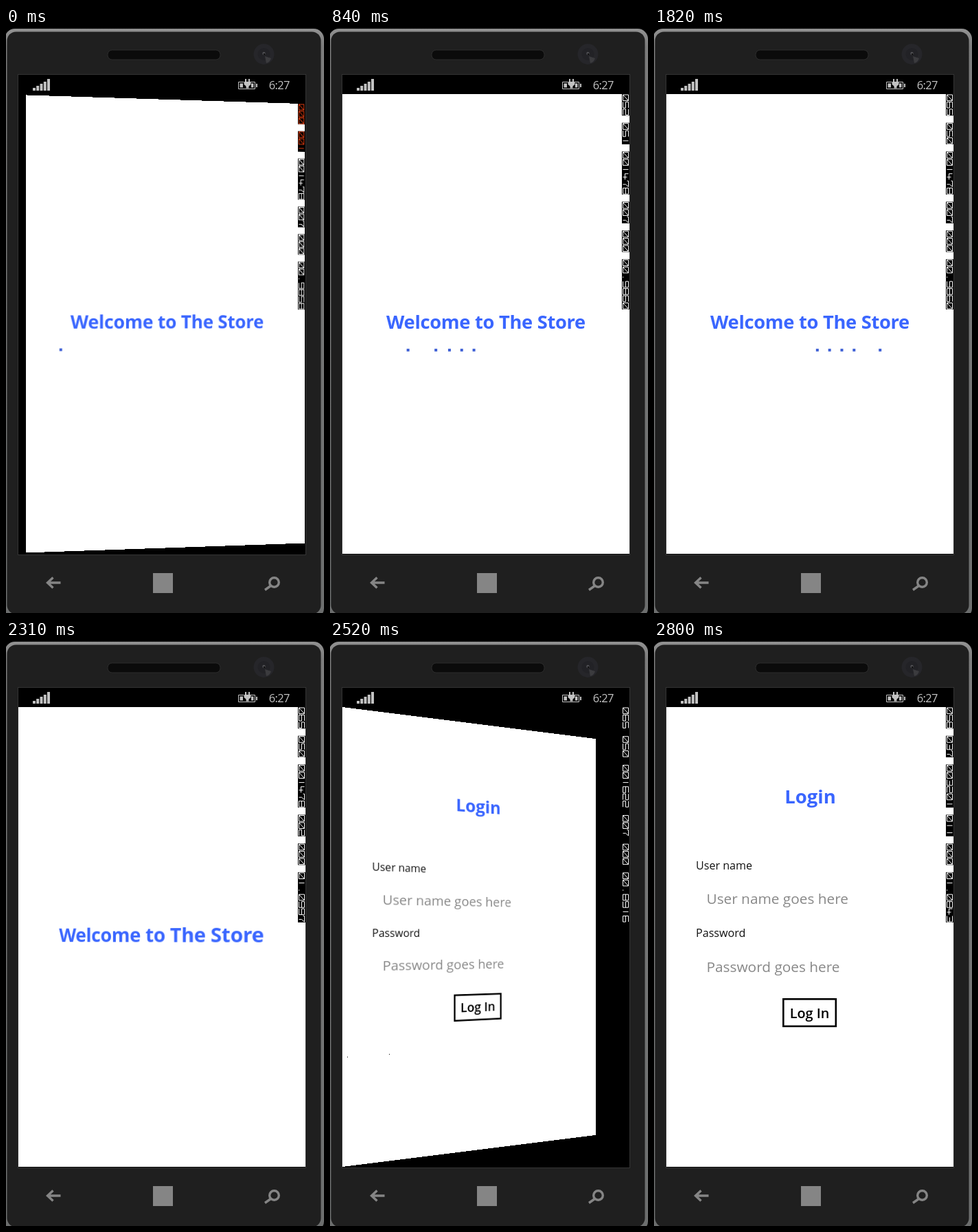
Write an HTML page that moves like this. It is 463 px wide and 850 px high and loops after 5.53 s.

```html
<!DOCTYPE html>
<html lang="en">
<head>
<meta charset="utf-8">
<title>Phone page turn</title>
<style>
  html, body { margin: 0; width: 100%; height: 100%; overflow: hidden; background: #000; }
  svg { position: absolute; left: 0; top: 0; display: block; }
  text { font-family: "Open Sans", "Noto Sans", sans-serif; }
  #stage { position: relative; width: 463px; height: 850px; overflow: hidden; }
  #screen, #app { position: absolute; width: 418px; height: 668px; overflow: hidden; perspective: 870px; }
  #screen { left: 18px; top: 96px; background: #000; perspective-origin: 50% 320px; }
  #app { left: 0; top: 0; perspective-origin: 50% 50%; }
  #app, .page { transform-origin: 0 50%; }
  .page { background: #fff; }
  .title { font-weight: 700; fill: #3a66ff; text-anchor: middle; }
  .label { font-size: 16.1px; fill: #111; }
  .hint { font-size: 20.8px; fill: #888; }
</style>
</head>
<body>
<div id="stage">
  <svg width="463" height="850" viewBox="0 0 463 850">
    <defs>
      <linearGradient id="rim" x2="0" y2="1">
        <stop offset="0" stop-color="#929292"/>
        <stop offset=".03" stop-color="#7c7c7c"/>
        <stop offset="1" stop-color="#6c6e6e"/>
      </linearGradient>
    </defs>
    <rect width="463" height="850" fill="#000"/>
    <rect x="-2" y="1" width="465" height="857" rx="15" fill="url(#rim)"/>
    <rect x="1.500" y="5.500" width="457" height="846" rx="13" fill="#1f1f1f"/>
    <rect x="148" y="32" width="164" height="14" rx="6.500" fill="#0b0b0b" stroke="#2c2c2c"/>
    <circle cx="375.500" cy="38" r="15" fill="#26262a"/>
    <circle cx="375.500" cy="38" r="9" fill="#222226"/>
    <path d="M377 41L386 44Q384 50 379 51Z" fill="#3b3b3e"/>
    <circle cx="375.500" cy="37" r="2.200" fill="#505054"/>
    <circle cx="376" cy="38" r="1.200" fill="#111"/>
    <rect x="17.500" y="67.500" width="419" height="698" fill="#000" stroke="#343434"/>

    <g fill="#c2c2c2">
      <path d="M39 87h4v4h-4zM44.200 84h4v7h-4zM49.500 81h4v10h-4zM54.800 78h4v13h-4zM60 74h4v17h-4z"/>
      <path d="M346 78.500H338.500V88.500H362.500V78.500H356" fill="none" stroke="#c2c2c2"/>
      <path d="M340.500 80.500h4.500v6h-4.500zM357 80.500h3.500v6h-3.500zM364 81h2v5h-2z"/>
      <path d="M348 74h2v4h3v-4h2v4h1.500v4l-3 2.500v3h-4v-3l-3-2.500v-4h1.500z"/>
      <text x="382.800" y="89" font-size="16.500" letter-spacing="-.7">6:27</text>
    </g>

    <g fill="none" stroke="#858585" stroke-width="3.400">
      <path d="M79.500 806H60M68.500 798.500L60.500 806L68.500 813.500"/>
      <circle cx="390.500" cy="805.500" r="6.800"/>
      <path d="M385.500 810.500L377 816.500"/>
    </g>
    <rect x="214" y="792" width="29" height="29" fill="#858585"/>
  </svg>

  <div id="screen">
    <div id="app">
      <svg id="welcome" class="page" width="418" height="668" viewBox="18 96 418 668">
        <text class="title" x="227" y="437" font-size="27.300" letter-spacing="-.3">Welcome to The Store</text>
        <g id="dots" fill="#4263d6"></g>
      </svg>
      <svg id="login" class="page" width="418" height="668" viewBox="18 96 418 668">
        <text class="title" x="227.500" y="235.500" font-size="27.500">Login</text>
        <text class="label" x="61" y="332">User name</text>
        <text class="hint" x="76.500" y="382">User name goes here</text>
        <text class="label" x="61" y="430">Password</text>
        <text class="hint" x="76.500" y="480.500">Password goes here</text>
        <rect x="188.300" y="520.300" width="76.500" height="39.500" fill="none" stroke="#000" stroke-width="2.600"/>
        <text x="226.500" y="547.500" font-size="19.800" font-weight="600" text-anchor="middle">Log In</text>
      </svg>
      <svg id="meter" width="418" height="668" viewBox="0 0 418 668">
        <g id="digits" transform="translate(418 0) rotate(90)"></g>
      </svg>
    </div>
  </div>
</div>

<script>
const LOOP = 5530, STEP = 70;
const EXIT = 2110, GONE = 2380, ENTER = 2438, SHOW = 2520;
const BAR = { x: 24.5, y: 466, w: 405 };
const $ = id => document.getElementById(id);
const app = $('app'), welcome = $('welcome'), login = $('login');

// Stroke glyphs on an 8.6 by 8 cell
const GLYPHS = {
  0: 'M0 0H8.6V8H0ZM0 8L8.6 0', 1: 'M4.3 0V8', 2: 'M0 0H8.6V4H0V8H8.6',
  3: 'M0 0H8.6V8H0M2 4H8.6', 4: 'M0 0V5H8.6M5 2V8', 5: 'M8.6 0H0V4H8.6V8H0',
  6: 'M8.6 0H0V8H8.6V4H0', 7: 'M0 2V0H8.6L5 4V8', 8: 'M0 0H8.6V8H0ZM0 4H8.6',
  9: 'M8.6 4H0V0H8.6V8H0', '.': 'M3.6 7.8H5'
};
const READINGS = [
  [0, '000 001 001478 007 000 00.9858'],
  [770, '052 051 001478 007 000 00.9860'],
  [1750, '065 050 001478 007 000 00.9860'],
  [2310, '065 050 001478 002 000 01.0997'],
  [2380, '065 050 002923 003 000 00.0000'],
  [2520, '065 050 001622 007 000 00.8916'],
  [2800, '058 037 003201 011 000 01.0843']
];

const dots = Array.from({ length: 5 }, () => {
  const dot = document.createElementNS(welcome.namespaceURI, 'rect');
  dot.setAttribute('y', BAR.y);
  dot.setAttribute('width', 4);
  dot.setAttribute('height', 4);
  return $('dots').appendChild(dot);
});

const easeIn = (x, power) => Math.expm1(power * x) / Math.expm1(power);
const easeOut = (x, power) => 1 - easeIn(1 - x, power);
const clamp = x => Math.min(1, Math.max(0, x));

function turn(node, angle, dx = 0, dz = 0) {
  node.style.transform = Math.abs(angle) < 0.02 ? 'none'
    : `translate3d(${dx}px, 0, ${dz}px) rotateY(${angle}deg)`;
}

// Fast in, slow across the middle third, fast out
function dotPlace(p) {
  if (p < 0.5) return 0.331 * easeOut(p / 0.5, 1);
  if (p < 2) return 0.331 + 0.33 * (p - 0.5) / 1.5;
  return 0.661 + 0.34 * easeIn((p - 2) / 0.5, 1);
}

function drawDots(t) {
  const lead = 0.115 + 1.14 * t / 1000;
  dots.forEach((dot, i) => {
    const p = lead - 0.2 * i;
    const on = p >= 0 && p < 2.5 && t < 2310;
    dot.style.display = on ? '' : 'none';
    if (on) dot.setAttribute('x', BAR.x + BAR.w * dotPlace(p) - 2);
  });
}

let shown = '';
function drawMeter(t) {
  const [from, reading] = READINGS.filter(r => r[0] <= t).pop();
  if (reading === shown) return;
  shown = reading;
  const pitch = 10.43;
  let at = 0, out = '';
  reading.split(' ').forEach((group, g) => {
    const color = from === 0 && g < 2 ? '#e03c10' : '#fff';
    out += `<rect x="${at * pitch}" width="${group.length * pitch}" height="11"/>`;
    [...group].forEach((c, i) => {
      out += `<path transform="translate(${(at + i) * pitch + 1} 1.5)" d="${GLYPHS[c]}" fill="none" stroke="${color}"/>`;
    });
    at += group.length + 1;
  });
  $('digits').innerHTML = out;
  $('meter').setAttribute('aria-label', reading);
}

function draw(t) {
  const launch = Math.exp(-t * 0.0171);
  const leave = 50 * easeIn(clamp((t - EXIT) / 250), 6);
  const arrive = 80 * (1 - easeOut(clamp((t - ENTER) / 350), 6));
  welcome.style.display = t < GONE ? '' : 'none';
  login.style.display = t >= SHOW ? '' : 'none';
  turn(app, 5 * launch, 10.5 * launch, -4 * launch);
  turn(welcome, -leave);
  turn(login, arrive);
  drawDots(t);
  drawMeter(t);
}

const start = performance.now();
function tick() {
  const t = (performance.now() - start) % LOOP;
  draw(Math.floor(t / STEP) * STEP);
  requestAnimationFrame(tick);
}
tick();
</script>
</body>
</html>
```
